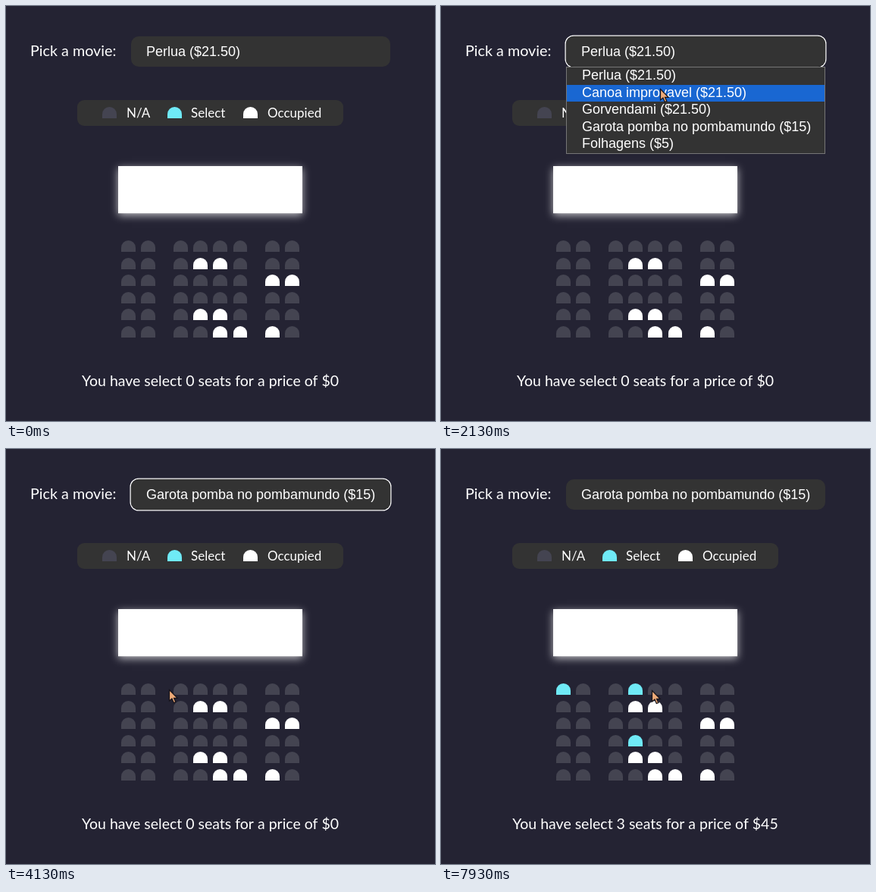
An HTML page with a canvas that plays this animation: 566 by 547 pixels, repeating every 8 s.

```html
<!DOCTYPE html>
<html lang="en">
<head>
<meta charset="utf-8">
<title>Seat booking</title>
<style>
html, body { margin: 0; width: 100%; height: 100%; overflow: hidden; background: #242333; }
canvas { display: block; position: relative; }
.screen {
  position: absolute; left: 148px; top: 211px; width: 243px; height: 87.5px;
  background: #fff; box-shadow: 0 3.75px 12.5px rgba(255, 255, 255, .7);
  transform: scaleY(.7071); transform-origin: top;
}
</style>
</head>
<body>
<div class="screen"></div>
<canvas width="566" height="547"></canvas>
<script>
const ctx = document.querySelector('canvas').getContext('2d');

const TICK = 1000 / 15, TICKS = 120;
const PANEL = '#333', FREE = '#444451', PICKED = '#6feaf6', WHITE = '#fff';
const LATO = 'Lato, sans-serif', ARIAL = '"Liberation Sans", Arial, sans-serif';

const MOVIES = [
  'Perlua ($21.50)', 'Canoa improvavel ($21.50)', 'Gorvendami ($21.50)',
  'Garota pomba no pombamundo ($15)', 'Folhagens ($5)'
];
const LIST_TOP = 81, ROW_H = 22.5;
const OPEN = 15, CLOSE = 54, BLUR = 76;

const SEAT_W = 18.75, SEAT_H = 15, SEAT_STEP = 26.25, AISLE = 16.25;
const HALL = ['oo oooo oo', 'oo o##o oo', 'oo oooo ##', 'oo oooo oo', 'oo o##o oo', 'oo oo## #o'];
// seat "row,column" -> tick of its click; the colour follows one tick after the total
const CLICKS = { '0,0': 78, '3,4': 102, '0,4': 115 };

// pointer moves; it rests in between, and a bow bends the way vertically
const MOVES = [
  { from: 2, to: 11, x: 330, y: 55 },
  { from: 18, to: 26, x: 309, y: 200 },
  { from: 26, to: 36, x: 278, y: 60 },
  { from: 39, to: 48, x: 286, y: 168 },
  { from: 54, to: 67, x: 180, y: 321, bow: 50 },
  { from: 70, to: 75, x: 159, y: 319 },
  { from: 82, to: 95, x: 254, y: 380 },
  { from: 103, to: 114, x: 256, y: 314, bow: -38 },
  { from: 117, to: 119, x: 278, y: 318 }
];

function pointerAt(tick) {
  let px = 556, py = 549;
  for (const { from, to, x, y, bow = 0 } of MOVES) {
    const u = Math.max(0, Math.min(1, (tick - from) / (to - from)));
    const k = u * u * (3 - 2 * u);
    px += (x - px) * k;
    py += (y - py) * k + bow * Math.sin(Math.PI * u);
  }
  return [px, py];
}

function text(str, x, y, font, align = 'left') {
  ctx.font = font;
  ctx.textAlign = align;
  ctx.fillStyle = WHITE;
  ctx.fillText(str, x, y);
}

function box(x, y, w, h, r, color) {
  ctx.beginPath();
  ctx.roundRect(x, y, w, h, r);
  ctx.fillStyle = color;
  ctx.fill();
}

function seat(x, y, color, scale = 1) {
  const left = Math.round(x), top = Math.round(y), width = Math.round(x + SEAT_W) - left;
  const w = width * scale, h = SEAT_H * scale;
  box(left - (w - width) / 2, top - (h - SEAT_H) / 2, w, h, [w / 2, w / 2, 0, 0], color);
}

function drawLegend() {
  box(94, 124, 351, 34, 9, PANEL);
  [['N/A', 127, 160, FREE], ['Select', 213, 245, PICKED], ['Occupied', 313, 346, WHITE]]
    .forEach(([label, seatX, textX, color]) => {
      seat(seatX, 133, color);
      text(label, textX - 1, 147, '17px ' + LATO);
    });
}

function drawSeats(tick) {
  const [px, py] = pointerAt(tick - 1);
  HALL.forEach((line, row) => {
    let x = 152;
    const y = 309 + row * 22.5;
    [...line].forEach((kind, col) => {
      if (kind === ' ') return x += AISLE;
      const hover = kind === 'o' && px >= x && px <= x + SEAT_W && py >= y && py <= y + SEAT_H;
      const color = kind === '#' ? WHITE : tick > CLICKS[row + ',' + col] ? PICKED : FREE;
      seat(x, y, color, hover ? 1.2 : 1);
      x += SEAT_STEP;
    });
  });
}

function drawSelect(tick) {
  if (tick >= OPEN && tick < BLUR) {
    box(163.5, 38.5, 345, 43, 11.5, WHITE);
    box(164.75, 39.75, 342.5, 40.5, 10.25, '#101014');
  }
  box(165, 40, 342, 40, 10, PANEL);
  text(MOVIES[tick < CLOSE ? 0 : 3], 185, 66, '18px ' + ARIAL);
}

function drawList(pointerY) {
  const rowTop = i => Math.round(LIST_TOP + i * ROW_H);
  const active = Math.max(0, Math.min(4, Math.floor((pointerY - LIST_TOP) / ROW_H)));
  box(165, 80, 342, 115, 0, '#767676');
  box(166, 81, 340, 113, 0, PANEL);
  box(166, rowTop(active), 340, rowTop(active + 1) - rowTop(active), 0, '#1967d2');
  MOVIES.forEach((name, i) => text(name, 186, rowTop(i) + 16, '18px ' + ARIAL));
}

function drawPointer(x, y) {
  ctx.save();
  ctx.translate(Math.round(x) + .5, Math.round(y) + .5);
  const arrow = new Path2D('M0 0V14.5L3.4 11.6 5.8 17 8.4 16 6 10.8H10.6Z');
  ctx.fillStyle = '#eeab78';
  ctx.fill(arrow);
  ctx.strokeStyle = '#15131a';
  ctx.lineWidth = 1.2;
  ctx.stroke(arrow);
  ctx.restore();
}

function draw(tick) {
  const [px, py] = pointerAt(tick);
  const count = Object.values(CLICKS).filter(t => tick >= t).length;
  ctx.clearRect(0, 0, 566, 547);
  text('Pick a movie:', 32, 66, '19.75px ' + LATO);
  drawLegend();
  drawSeats(tick);
  text(`You have select ${count} seats for a price of $${count * 15}`, 269.5, 501, '19.5px ' + LATO, 'center');
  drawSelect(tick);
  if (tick >= OPEN && tick < CLOSE) drawList(py);
  if (tick > 2) drawPointer(px, py);
}

const start = performance.now();
function frame() {
  const time = performance.now() - start;
  draw(Math.floor((time + 4) / TICK) % TICKS);
  requestAnimationFrame(frame);
}
frame();
</script>
</body>
</html>
```
